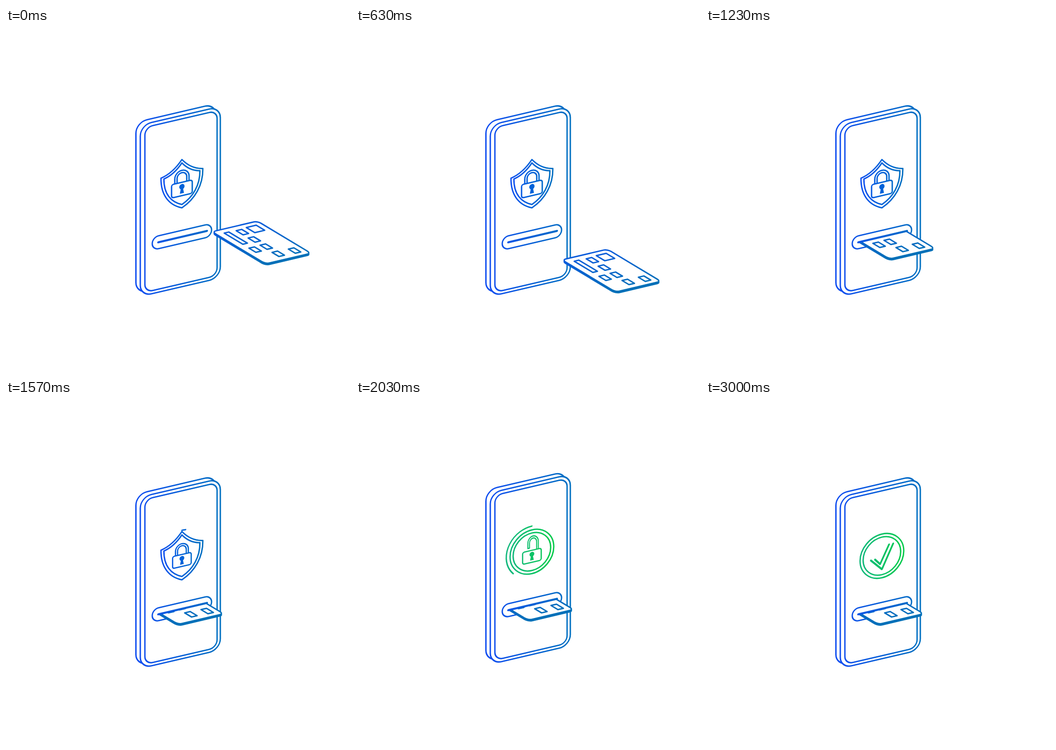
An HTML page for the animation above (4030 ms loop, 748x748 px).

```html
<!DOCTYPE html>
<html lang="en">
<head>
<meta charset="utf-8">
<title>Card payment</title>
<style>
  html, body { margin: 0; width: 100%; height: 100%; overflow: hidden; background: #fff; }
  svg { display: block; width: 100%; height: 100%; }
  .phone { stroke: url(#phoneInk); }
  .badge { stroke: url(#badgeInk); }
  .card { stroke: url(#cardInk); }
  .card rect, .shield { vector-effect: non-scaling-stroke; }
  .solid { fill: url(#badgeInk); stroke: none; }
</style>
</head>
<body>
<svg viewBox="0 0 748 748" fill="#fff" stroke-width="3" stroke-linejoin="round" stroke-linecap="round">
  <defs>
    <linearGradient id="phoneInk" gradientUnits="userSpaceOnUse" x1="-92" x2="86">
      <stop stop-color="#104ef0"/><stop offset="1" stop-color="#0070c0"/>
    </linearGradient>
    <linearGradient id="badgeInk" gradientUnits="userSpaceOnUse" x1="-50" x2="50">
      <stop id="inkLeft"/><stop id="inkRight" offset="1"/>
    </linearGradient>
    <linearGradient id="cardInk" gradientUnits="userSpaceOnUse" x1="0" x2="117">
      <stop stop-color="#0a5bdc"/><stop offset="1" stop-color="#0070b8"/>
    </linearGradient>
    <clipPath id="outsideSlot"><path d="M0 748V543L330 466 440 441V0H748V748Z"/></clipPath>
  </defs>
  <g id="scene">
    <!-- the phone's face is a sheared plane centred on the badge -->
    <g class="phone" transform="matrix(1 -.233 0 1 382.5 339)">
      <rect x="-100" y="-157.3" width="174" height="372.5" rx="24"/>
      <rect x="-90.5" y="-149" width="174" height="372.5" rx="24"/>
      <rect x="-80.5" y="-141.5" width="157" height="358.5" rx="17"/>
      <rect x="-64.5" y="101" width="129" height="28" rx="14"/>
    </g>
    <g class="badge" transform="matrix(1 -.233 0 1 382.5 339)">
      <path class="shield"/>
      <path class="shield" transform="scale(.86)"/>
      <path id="spinner" fill="none" pathLength="1" d="M0-55.8a55.8 55.8 0 1 1-.01 0"/>
      <g id="lock">
        <path id="shackle" d="M-15.5-2V-14A15.5 15.5 0 0 1 15.5-14V8H10.5V-14A10.5 10.5 0 0 0-10.5-14V-2Z"/>
        <rect x="-22.5" y="-3.5" width="45" height="29" rx="4.5"/>
        <circle class="solid" cy="6" r="5.8"/>
        <path class="solid" d="M-2 8H2L4.5 20.5H-4.5Z"/>
      </g>
      <g fill="none" stroke-width="4">
        <path id="tick" pathLength="1" d="M-24 4.4 0 29 24.5-21.3"/>
        <path id="innerTick" pathLength="1" d="M-15 4.5-4 17 15.5-21.4"/>
      </g>
    </g>
    <g clip-path="url(#outsideSlot)">
      <g id="card" class="card">
        <g id="cardFace" transform="matrix(1 .6 1 -.235 448 443)">
          <rect width="116.5" height="98.5" rx="8" fill="url(#cardInk)" transform="translate(3.6 -3.6)"/>
          <rect width="116.5" height="98.5" rx="8"/>
          <rect x="10" y="64.5" width="18.5" height="21.5"/>
          <rect x="11" y="15.5" width="40.5" height="10"/>
        </g>
      </g>
    </g>
    <g class="phone" transform="matrix(1 -.233 0 1 382.5 339)">
      <path stroke-width="4.5" d="M-51.5 115H54.5"/>
    </g>
  </g>
</svg>
<script>
const LOOP = 4030, STEP = 100 / 3;
const $ = id => document.getElementById(id);
const place = (id, value) => $(id).setAttribute('transform', value);
const mix = (a, b, p) => a + (b - a) * p;
const smooth = s => s * s * (3 - 2 * s);
const span = (t, from, to) => Math.min(1, Math.max(0, (t - from) / (to - from)));

// cubic-bezier(2/3, 0, 2/3, 1)
function ease(u) {
  let low = 0, high = 1;
  for (let i = 0; i < 24; i++) {
    const s = (low + high) / 2;
    if (2 * s * (1 - s) + s ** 3 < u) low = s; else high = s;
  }
  return smooth((low + high) / 2);
}
const eased = (t, from, to) => ease(span(t, from, to));

// right halves, top to bottom; the left half is their mirror image
const SHIELD = [[0, -53], [13.3, -36.3], [28.5, -26.3], [45.5, -23], [46, 14], [28, 40], [0, 52]];
const CIRCLE = [[0, -47.5], [26.2, -47.5], [47.5, -26.2], [47.5, 0], [47.5, 26.2], [26.2, 47.5], [0, 47.5]];
function badgePath(p) {
  const right = SHIELD.map(([x, y], i) => [mix(x, CIRCLE[i][0], p), mix(y, CIRCLE[i][1], p)]);
  const left = right.slice(0, -1).reverse().map(([x, y]) => [-x, y]);
  return `M${right[0]}C${right.slice(1).concat(left).join(' ')}Z`;
}

function trim(id, start, end) {
  const path = $(id), length = end - start;
  path.style.visibility = length > 0.001 ? 'visible' : 'hidden';
  path.style.strokeDasharray = `${length} 2`;
  path.style.strokeDashoffset = -start;
}

const blend = (to, from, p) => `color-mix(in srgb, ${to} ${p * 100}%, ${from})`;

for (const [x, y] of [[19.5, 46.5], [46, 46], [72, 46], [98, 46], [73, 20.8], [99.5, 80]]) {
  const field = document.createElementNS('http://www.w3.org/2000/svg', 'rect');
  Object.entries({ x: x - 7.5, y: y - 6, width: 15, height: 12 })
    .forEach(([name, value]) => field.setAttribute(name, value));
  $('cardFace').append(field);
}

function draw(t) {
  const drop = eased(t, 200, 800), insert = eased(t, 867, 1317);
  place('card', `translate(${-190 * insert} ${87 * drop - 112 * insert})`);

  const jump = smooth(span(t, 1678, 1900)) - smooth(span(t, 1900, 2115));
  place('scene', `translate(0 ${-28 * jump})`);

  const unlock = smooth(span(t, 1667, 1900));
  const outline = badgePath(unlock);
  document.querySelectorAll('.shield').forEach(path => path.setAttribute('d', outline));
  $('inkLeft').style.stopColor = blend('#12b87c', '#104ef0', unlock);
  $('inkRight').style.stopColor = blend('#08cb4a', '#0070c0', unlock);
  trim('spinner', eased(t, 1755, 2160), eased(t, 1500, 1900));

  const size = 1 - 0.1 * smooth(span(t, 1220, 1500)) + 0.1 * smooth(span(t, 2370, 2500));
  const leave = smooth(span(t, 2500, 2700));
  place('lock', `scale(${size * (1 - leave)})`);
  $('lock').style.visibility = leave < 1 ? 'visible' : 'hidden';
  place('shackle', `translate(${2.8 * unlock} ${-8 * unlock}) scale(${1 - 0.18 * unlock} 1)`);

  trim('tick', 0, eased(t, 2367, 3000));
  trim('innerTick', 0, eased(t, 2500, 3000));
}

const begin = performance.now();
function frame() {
  const t = (performance.now() - begin) % LOOP;
  draw(Math.floor((t + 5) / STEP) * STEP % LOOP);
  requestAnimationFrame(frame);
}
frame();
</script>
</body>
</html>
```
